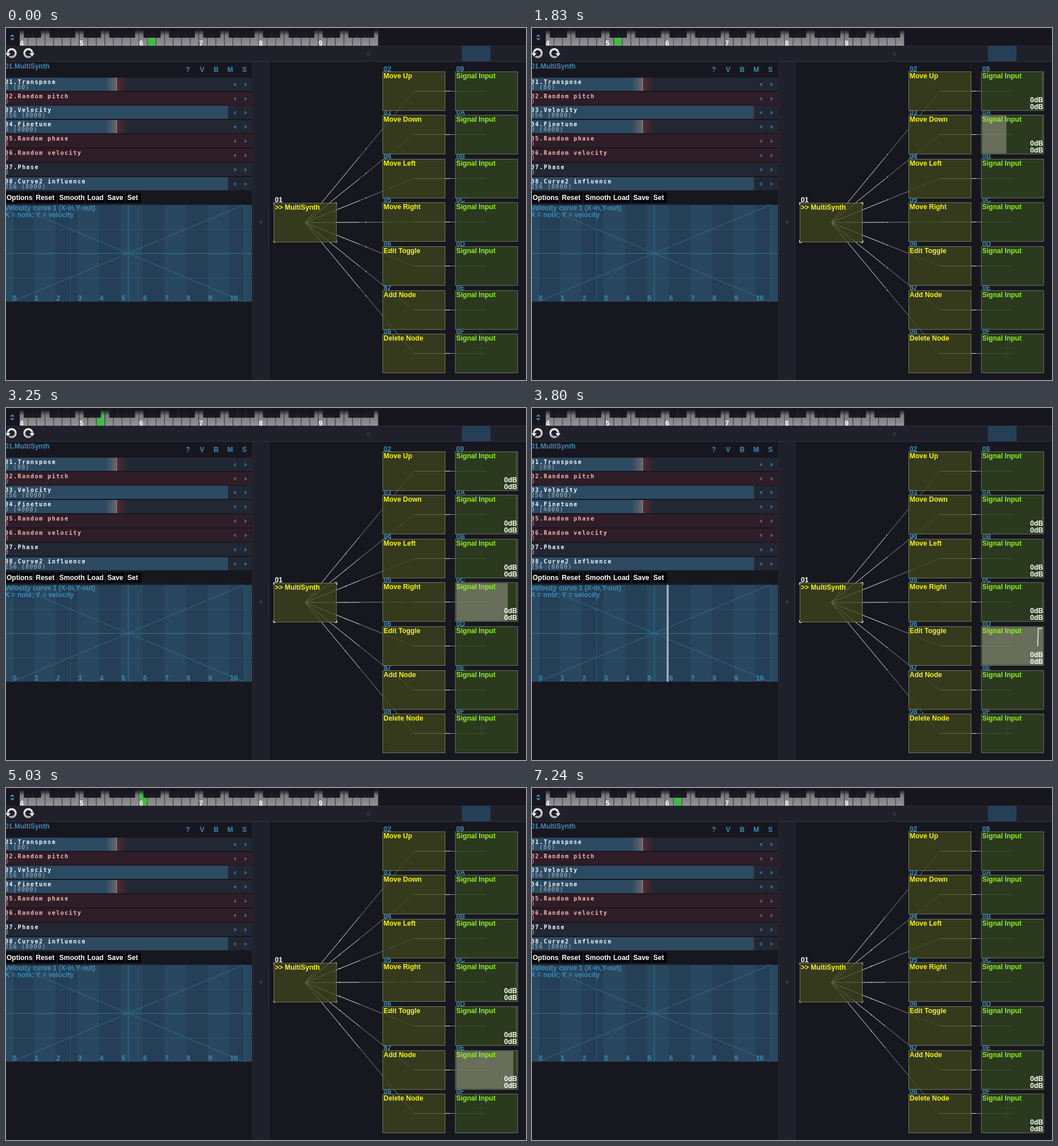
Write an HTML page with a canvas that moves like this. It is 909 px wide and 616 px high and loops after 7310 ms.

```html
<!DOCTYPE html>
<html lang="en">
<head>
<meta charset="utf-8">
<title>MultiSynth patch</title>
<style>
html, body { margin: 0; width: 100%; height: 100%; overflow: hidden; background: #171720; }
canvas { display: block; }
</style>
</head>
<body>
<canvas id="stage" width="909" height="616"></canvas>
<script>
const ctx = document.getElementById('stage').getContext('2d');
const LOOP = 7310, FLASH = 66, PEAK_HOLD = 2880;
const BLUE = '#3f8ab5', PANEL = '#20202b';
const UI = 'bold 12px "Liberation Sans", Arial, sans-serif';
const SMALL = '10px "DejaVu Sans Mono", monospace';

// One played note per output: start time, note number, key index, scope edge
const notes = [
  { at: 425, note: 61, key: 8, black: true, edge: 40 },
  { at: 1270, note: 62, key: 8, edge: 24 },
  { at: 2125, note: 60, key: 7, edge: 56 },
  { at: 2960, note: 64, key: 9, edge: 32 },
  { at: 3795, note: 71, key: 13, edge: 8 },
  { at: 4796, note: 72, key: 14, edge: 48 },
  { at: 5795, note: 74, key: 15, edge: 72 }
];
const actions = ['Move Up', 'Move Down', 'Move Left', 'Move Right',
  'Edit Toggle', 'Add Node', 'Delete Node'];
const controls = [
  ['Transpose', '0 (80)', 'mid'], ['Random pitch', '0', 'red'],
  ['Velocity', '256 (8000)', 'full'], ['Finetune', '0 (4000)', 'mid'],
  ['Random phase', '0', 'red'], ['Random velocity', '0', 'red'],
  ['Phase', '0', ''], ['Curve2 influence', '256 (8000)', 'full']
];
const buttons = [['Options', 1, 45], ['Reset', 52, 36], ['Smooth', 93, 44],
  ['Load', 142, 30], ['Save', 177, 30], ['Set', 212, 24]];

function rect(x, y, w, h, color) {
  ctx.fillStyle = color;
  ctx.fillRect(x, y, w, h);
}

function line(points, color, width = 1) {
  ctx.strokeStyle = color;
  ctx.lineWidth = width;
  ctx.beginPath();
  points.forEach(([x, y]) => ctx.lineTo(x, y));
  ctx.stroke();
}

function poly(points, color) {
  ctx.fillStyle = color;
  ctx.beginPath();
  points.forEach(([x, y]) => ctx.lineTo(x, y));
  ctx.fill();
}

function text(str, x, y, color, align = 'left') {
  ctx.fillStyle = color;
  ctx.font = UI;
  ctx.textAlign = align;
  ctx.fillText(str, x, y);
}

function wideText(str, x, y, color, weight) {
  ctx.save();
  ctx.font = weight + ' ' + SMALL;
  ctx.letterSpacing = weight ? '1.45px' : '1.2px';
  ctx.textAlign = 'left';
  ctx.fillStyle = color;
  ctx.fillText(str, x, y);
  ctx.restore();
}

function gradient(x0, y0, x1, y1, ...stops) {
  const g = ctx.createLinearGradient(x0, y0, x1, y1);
  stops.forEach((c, i) => g.addColorStop(i / (stops.length - 1), c));
  return g;
}

function heldKey(t) {
  return notes.find((n, i) => {
    const next = notes[(i + 1) % notes.length].at + (i === notes.length - 1 ? LOOP : 0);
    const off = next - 100, on = n.at + FLASH;
    return (t >= on && t < off) || t + LOOP < off;
  });
}

function keyboard(t) {
  const x0 = 24, w = 627 / 42, held = heldKey(t);
  rect(0, 0, 909, 31, '#17161f');
  poly([[7, 15], [11, 11], [15, 15]], BLUE);
  poly([[7, 18], [11, 22], [15, 18]], BLUE);
  for (let k = 0; k < 42; k++) {
    const lit = held && !held.black && held.key === k;
    rect(x0 + k * w, 3, w - 1, 28, lit ? '#45b84c' : gradient(0, 3, 0, 31, '#6c6c6e', '#808083', '#939396'));
    rect(x0 + k * w + w - 1, 3, 1, 28, '#4a4a50');
  }
  for (let k = 1; k < 42; k++) {
    if (k % 7 === 0 || k % 7 === 3) continue;
    const lit = held && held.black && held.key === k;
    rect(x0 + (k - 0.5) * w, 3, w, 14, lit ? '#5d8a2c' : '#1b1a22');
    line([[x0 + (k - 0.5) * w, 4], [x0 + (k - 0.5) * w, 17]], '#2b2a34', 0.7);
  }
  rect(x0, 3, 627, 10, gradient(0, 3, 0, 13, 'rgba(20,19,27,.95)', 'rgba(20,19,27,0)'));
  for (let o = 0; o < 6; o++) text(4 + o, x0 + o * 7 * w, 30.5, '#fff');
}

function turnIcon(x, dir) {
  ctx.save();
  ctx.translate(x, 44);
  ctx.scale(dir, 1);
  ctx.strokeStyle = gradient(0, -9, 0, 9, '#f4f4f4', '#a8a8ac');
  ctx.lineWidth = 3.5;
  ctx.beginPath();
  ctx.arc(0, 0, 7, -3.1, 2.2);
  ctx.stroke();
  poly([[-11, 0], [-2, 0], [-6.5, 6]], '#e6e6e8');
  ctx.restore();
}

function grip(x, y) {
  ctx.strokeStyle = '#454552';
  ctx.lineWidth = 1;
  ctx.strokeRect(x - 1.5, y - 1.5, 4, 4);
}

function toolbar() {
  rect(0, 31, 909, 28, PANEL);
  line([[0, 31.5], [909, 31.5]], '#2a2a35');
  line([[0, 58.5], [909, 58.5]], '#343440');
  rect(797, 31, 50, 27, '#253f57');
  turnIcon(10, 1);
  turnIcon(39, -1);
  grip(633, 45);
  rect(431, 59, 29, 557, PANEL);
  line([[431.5, 59], [431.5, 616]], '#30303b');
  line([[459.5, 59], [459.5, 616]], '#343440');
  grip(445, 339);
}

function controlRow([name, value, kind], i) {
  const y = Math.round(86.7 + i * 24.86), h = 23, red = kind === 'red';
  rect(0, y, 430, h, red ? '#2f1d27' : '#222734');
  if (kind === 'full') rect(0, y, 388, h, '#2c4a62');
  if (kind === 'mid') {
    rect(0, y, 193, h, '#2c4a62');
    rect(174, y, 19, h, gradient(174, 0, 193, 0, 'rgba(104,100,106,0)', '#6a666c'));
    rect(193, y, 20, h, gradient(193, 0, 213, 0, '#4c2f39', '#40262f', '#222734'));
    line([[193.5, y], [193.5, y + h]], '#928788');
  }
  const mid = y + 12;
  poly([[402, mid - 3.5], [402, mid + 3.5], [397.5, mid]], '#356b8e');
  poly([[417, mid - 3.5], [417, mid + 3.5], [421.5, mid]], '#356b8e');
  wideText(String(i + 1).padStart(2, '0') + '.' + name, -2, y + 11.3, red ? '#f2b4b4' : '#f3f5f7', 'bold');
  wideText(value, -2, y + 20, red ? '#b98e92' : '#a9b6c2', '');
}

function curvePanel(t) {
  const top = 309.5, bottom = 479, step = 37.95;
  rect(0, top, 430, bottom - top, '#29485f');
  for (let i = 0; i < 11; i += 2) rect(11 + i * step, top, i === 10 ? 25 : step, bottom - top, '#243f56');
  for (let i = 0; i < 5; i++) {
    const x = 11.5 + i * 101.2;
    if (i !== 3) line([[x, top], [x, bottom]], i === 2 ? '#357792' : '#2b5871');
  }
  [352, 394, 437].forEach(y => line([[0, y + 0.5], [430, y + 0.5]], y === 394 ? '#357792' : '#2b556e'));
  line([[11, bottom], [416, top]], '#33708d');
  line([[11, top], [416, bottom]], '#33708d');
  text('Velocity curve 1 (X-in,Y-out)', -2, 319, BLUE);
  text('X = note; Y = velocity', -2, 331, BLUE);
  for (let i = 0; i < 11; i++) text(i, 12 + i * step, 476.5, BLUE);
  const hit = notes.find(n => t >= n.at && t < n.at + FLASH);
  if (hit) rect(11 + hit.note * step / 12, top, 3.2, bottom - top, '#aab7bf');
}

function leftPanel(t) {
  text('01.MultiSynth', -2, 70.5, BLUE);
  [...'?VBMS'].forEach((c, i) => text(c, 318 + i * 24.7, 77, BLUE, 'center'));
  controls.forEach(controlRow);
  buttons.forEach(([name, x, w]) => {
    rect(x - 2, 288, w + 2, 18, '#050508');
    text(name, x, 301, '#fff');
  });
  curvePanel(t);
}

const nodeTop = i => 76.5 + Math.floor(i * 76.6);

function wire(x0, y0, x1, y1) {
  const mx = (x0 + x1) / 2, my = (y0 + y1) / 2;
  line([[x0, y0], [mx, my]], '#e2e2e4');
  line([[mx, my], [x1, y1]], '#85858a');
}

function nodeBox(x, y, fill, border) {
  rect(x, y, 109, 68, fill);
  ctx.strokeStyle = border;
  ctx.lineWidth = 1;
  ctx.strokeRect(x, y, 109, 68);
}

function output(n, y, t) {
  const age = t - n.at;
  if (age < 0) return;
  const level = 106 * Math.min(1, Math.max(0, 1 - (age - 200) / 600));
  if (level > 0) rect(787, y + 1, level, 66, 'rgba(170,168,154,.48)');
  if (age < FLASH) {
    line([[892 - n.edge, y + 34.5], [893 - n.edge, y + 3], [892, y + 3]], '#f4f4f0', 1.4);
  }
  if (age < PEAK_HOLD) rect(891, y + 1, 2, 66, 'rgba(170,168,154,.2)');
}

function corners(x, y, w, h, color) {
  [[x, y, 1, 1], [x + w, y, -1, 1], [x, y + h, 1, -1], [x + w, y + h, -1, -1]]
    .forEach(([cx, cy, sx, sy]) => line([[cx, cy + 4 * sy], [cx, cy], [cx + 4 * sx, cy]], color));
}

function patch(t) {
  const cx = 523, cy = 340.5, phase = (0.12 + t / 2000) % 1;
  const hex = n => '0' + n.toString(16).toUpperCase();
  actions.forEach((_, i) => {
    const y = nodeTop(i), mid = y + 34;
    text(hex(i + 2), 660, y - 1, BLUE);
    text(hex(i + 9), 787, y - 1, BLUE);
    wire(cx, cy, 713, mid);
    wire(713, mid, 840, mid);
    [0, 0.5].forEach(half => {
      const f = phase / 2 + half;
      rect(cx + 190 * f - 0.8, cy + (mid - cy) * f - 0.8, 1.6, 1.6, 'rgba(255,255,255,.75)');
    });
  });
  line([[818, 560.5], [844, 560.5]], '#55555b');
  line([[830.5, 549], [830.5, 576]], '#55555b');

  text('01', 470, 304.5, '#fff');
  nodeBox(468.5, 306.5, 'rgba(62,68,28,.78)', '#74765a');
  corners(467.5, 305.5, 111, 70, t % 500 < 250 ? '#77777b' : '#e8e8e8');
  text('>> MultiSynth', 470, 317.8, '#f4f41c');

  actions.forEach((name, i) => {
    const y = nodeTop(i), age = t - notes[i].at;
    nodeBox(658.5, y, 'rgba(62,68,28,.78)', '#74765a');
    nodeBox(785.5, y, 'rgba(49,68,30,.78)', '#62735a');
    output(notes[i], y, t);
    text(name, 660, y + 11.3, '#f4f41c');
    text('Signal Input', 787, y + 11.3, '#8df21c');
    if (age >= 0 && age < PEAK_HOLD) {
      text('0dB', 893.5, y + 53.8, '#fff', 'right');
      text('0dB', 893.5, y + 65.5, '#fff', 'right');
    }
  });
}

function draw(now) {
  const t = now % LOOP;
  rect(0, 0, 909, 616, '#171720');
  keyboard(t);
  toolbar();
  leftPanel(t);
  patch(t);
}

let start;
function tick(now) {
  if (start === undefined) start = now;
  draw(now - start);
  requestAnimationFrame(tick);
}
draw(0);
requestAnimationFrame(tick);
</script>
</body>
</html>
```
